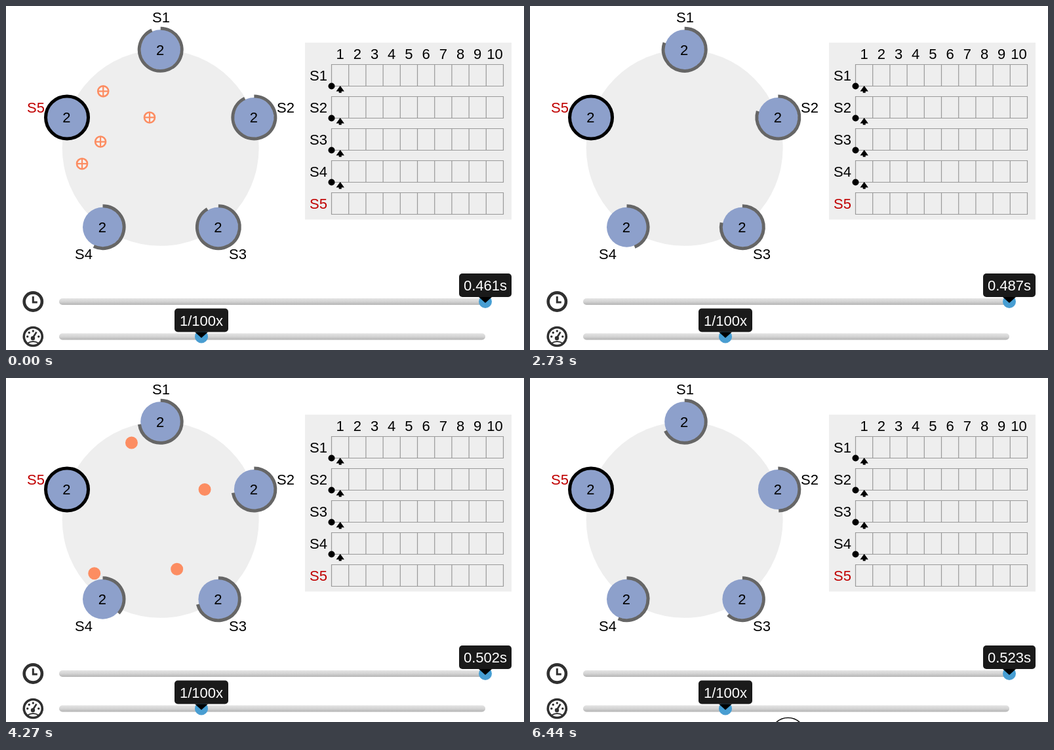
Recreate the animation shown at these times as an HTML page. Size 790 by 526 pixels, loop 6.51 s.

```html
<!DOCTYPE html>
<html lang="en">
<head>
<meta charset="utf-8">
<title>Heartbeats</title>
<style>
  html, body { margin: 0; width: 100%; height: 100%; overflow: hidden; background: #fff; }
  svg { display: block; font: 22px "Liberation Sans", Arial, sans-serif; }
  .mid { text-anchor: middle; }
  .leader { fill: #c00000; }
  .arc { fill: none; stroke: #666; stroke-width: 5; }
  .grid { fill: none; stroke: #999; stroke-width: 1.2; }
  .msg { stroke: #fc8d62; stroke-width: 2.6; fill: #fc8d62; }
  .reply { fill: #f6f1ef; }
  .reply path { stroke-width: 2.2; }
  .icon { fill: none; stroke: #303030; }
</style>
</head>
<body>
<svg id="stage" width="790" height="526" viewBox="0 0 790 526">
  <defs>
    <linearGradient id="track" x2="0" y2="1">
      <stop stop-color="#e4e4e4"/><stop offset=".5" stop-color="#d4d4d4"/><stop offset="1" stop-color="#b4b4b4"/>
    </linearGradient>
    <linearGradient id="knob" x2="0" y2="1">
      <stop stop-color="#3fa0d8"/><stop offset="1" stop-color="#4c9dd0"/>
    </linearGradient>
  </defs>
</svg>
<script>
const STEP = 70, LOOP = 6510;
const CX = 235.7, CY = 216.8, RING = 150, FRINGE = 38;
const SEND = 43.7;          // step at which the leader sends its heartbeats
const stage = document.getElementById('stage');

function add(tag, attrs, parent = stage, text) {
  const el = document.createElementNS('http://www.w3.org/2000/svg', tag);
  for (const k in attrs) el.setAttribute(k, attrs[k]);
  if (text !== undefined) el.textContent = text;
  parent.appendChild(el);
  return el;
}
const label = (x, y, text, cls = '') => add('text', { x, y, class: cls }, stage, text);

function place(i) {
  const a = (i * 72 - 90) * Math.PI / 180;
  return { x: CX + RING * Math.cos(a), y: CY + RING * Math.sin(a) };
}

// timer: degrees left at step 0; reset: degrees left at step 69, after the heartbeat
// old: span of the earlier reply; turn, end: span of the next reply
const followers = [
  { timer: 336, reset: 272, old: [-10.45, 4.5], turn: 64.45, end: 77.8 },
  { timer: 334, reset: 206, old: [-9.8, 7.1], turn: 64.75, end: 82.9 },
  { timer: 329, reset: 250, old: [-13.2, 1.8], turn: 65.1, end: 80.2 },
  { timer: 205, reset: 231, old: [-10.2, 5.8], turn: 61.6, end: 78.6 }
];
const leader = place(4);

// servers
add('circle', { cx: CX, cy: CY, r: RING, fill: '#eee' });
const names = [[223, 24.5], [413, 163], [340, 387], [105, 387], [32, 163]];
names.forEach(([x, y], i) => {
  const p = place(i);
  add('circle', { cx: p.x, cy: p.y, r: 30.5, fill: '#8da0cb' });
  if (i < 4) Object.assign(followers[i], p, { arc: add('path', { class: 'arc' }) });
  else add('circle', { cx: p.x, cy: p.y, r: 32.5, class: 'arc', style: 'stroke:#000' });
  label(p.x - .6, p.y + 7.7, '2', 'mid');
  label(x, y, 'S' + (i + 1), i === 4 ? 'leader' : '');
});

// messages
for (const f of followers) {
  f.request = add('circle', { r: 8.2, class: 'msg' });
  f.reply = add('g', { class: 'msg reply' });
  add('circle', { r: 8 }, f.reply);
  add('path', { d: 'M-8 0H8M0-8V8' }, f.reply);
}

// logs
add('rect', { x: 456, y: 56, width: 315, height: 270.5, fill: '#eee' });
for (let c = 0; c < 10; c++) label(509.6 + 26.2 * c, 81, c + 1, 'mid');
for (let r = 0; r < 5; r++) {
  const y = 89.5 + 49 * r;
  label(463, y + 24.5, 'S' + (r + 1), r === 4 ? 'leader' : '');
  let d = `M496.5 ${y}h262v33h-262z`;
  for (let c = 1; c < 10; c++) d += `M${496.5 + 26.2 * c} ${y}v33`;
  add('path', { d, class: 'grid' });
  if (r === 4) continue;
  add('circle', { cx: 496.5, cy: y + 33, r: 5 });
  add('path', { d: `M509.7 ${y + 32.5}l6.2 8.5h-4.2v2.3h-4v-2.3h-4.2z` });
}

// sliders
function slider(y, x, w, text) {
  add('rect', { x: 81, y: y - 5, width: 650, height: 10, rx: 5, fill: 'url(#track)' });
  add('circle', { cx: x, cy: y, r: 10, fill: 'url(#knob)' });
  add('rect', { x: x - w / 2, y: y - 43, width: w, height: 36, rx: 5, fill: '#1a1a1a' });
  add('path', { d: `M${x - 10} ${y - 7}h20l-10 9z` });
  const t = label(x, y - 17, text, 'mid');
  t.setAttribute('fill', '#fff');
  return t;
}
const clock = slider(452, 731, 80, '');
slider(505.5, 298, 82, '1/100x');

// clock and gauge icons
add('circle', { cx: 41.3, cy: 452, r: 13.6, class: 'icon', 'stroke-width': 4.6 });
add('path', { d: 'M41.3 444v9h6.5', class: 'icon', 'stroke-width': 3 });
add('circle', { cx: 41.3, cy: 505.5, r: 14, class: 'icon', 'stroke-width': 3.6 });
for (const a of [180, 225, 270, 0]) {
  const t = a * Math.PI / 180;
  add('circle', { cx: 41.3 + 8.5 * Math.cos(t), cy: 505.5 + 8.5 * Math.sin(t), r: 1.7, fill: '#303030' });
}
add('path', { d: 'M40.5 508L46.5 498.5', class: 'icon', 'stroke-width': 2.6 });
add('circle', { cx: 41, cy: 508, r: 3.2, fill: '#303030' });
add('path', { d: 'M33 515.5q8.3-5 16.6 0', class: 'icon', 'stroke-width': 2 });

const badge = add('circle', { cx: 393.5, cy: 546, r: 26.5, fill: '#fff', stroke: '#111', 'stroke-width': 1.6 });

const show = (el, on) => el.setAttribute('visibility', on ? 'visible' : 'hidden');

// put a message on the way between the rims of two servers
function travel(el, from, to, n, start, end) {
  const on = n >= start && n < end;
  show(el, on);
  if (!on) return;
  const dx = to.x - from.x, dy = to.y - from.y, dist = Math.hypot(dx, dy);
  const k = (FRINGE + (n - start) / (end - start) * (dist - 2 * FRINGE)) / dist;
  el.setAttribute('transform', `translate(${from.x + dx * k} ${from.y + dy * k})`);
}

function drawArc(f, deg) {
  const a = deg * Math.PI / 180, r = 32.5;
  f.arc.setAttribute('d', `M${f.x} ${f.y - r}A${r} ${r} 0 ${deg > 180 ? 1 : 0} 1 ` +
    `${f.x + r * Math.sin(a)} ${f.y - r * Math.cos(a)}`);
}

function draw(now) {
  const n = Math.floor(now % LOOP / STEP);
  clock.textContent = (Math.floor(461.8 + n * 2 / 3) / 1000).toFixed(3) + 's';
  for (const f of followers) {
    drawArc(f, n < f.turn ? f.timer - 1.2 * n : f.reset - 1.2 * (n - 69));
    travel(f.request, leader, f, n, SEND, f.turn);
    const [start, end] = n < SEND ? f.old : [f.turn, f.end];
    travel(f.reply, f, leader, n, start, end);
  }
  show(badge, n >= 91);
}

let origin;
function tick(now) {
  origin ??= now;
  draw(now - origin);
  requestAnimationFrame(tick);
}
draw(0);
requestAnimationFrame(tick);
</script>
</body>
</html>
```
